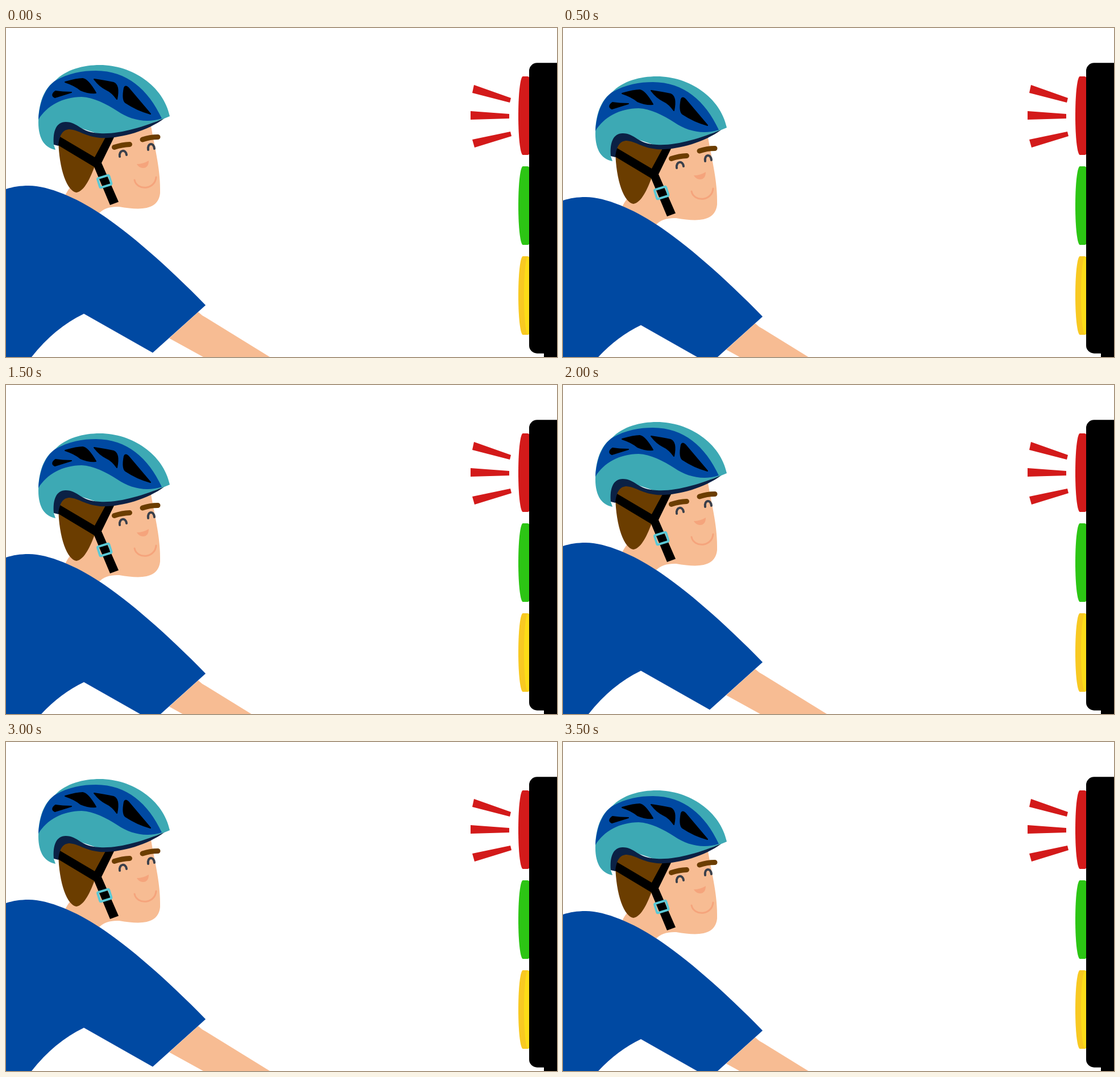
These frames come from a looping animation (969 by 578 pixels, 4000 ms). An HTML page with a canvas:

```html
<!DOCTYPE html>
<html lang="en">
<head>
<meta charset="utf-8">
<title>Cyclist at the lights</title>
<style>
  html, body { margin: 0; width: 100%; height: 100%; overflow: hidden; background: #fff; }
  canvas { display: block; }
</style>
</head>
<body>
<canvas id="stage" width="969" height="578"></canvas>
<script>
const ctx = document.getElementById('stage').getContext('2d');
const LOOP = 4000, BEAT = 500, DROP = 20;
const SKIN = '#f7bc93', BLUSH = '#f5a47c', HAIR = '#6b3d00', BLUE = '#0049a2',
      TEAL = '#3da9b4', NAVY = '#0b2145', RED = '#d31a1a';

function fill(d, color) {
  ctx.fillStyle = color;
  ctx.fill(new Path2D(d));
}

function line(d, color, width, cap = 'butt') {
  ctx.strokeStyle = color;
  ctx.lineWidth = width;
  ctx.lineCap = cap;
  ctx.lineJoin = 'round';
  ctx.stroke(new Path2D(d));
}

function drawBody() {
  fill('M338 499 Q344 505 352 509 L464 578 L496 598 H384 L347 578 L287 545 Z', SKIN);
  fill('M116 277 Q110 282 104 294 L164 325 Q176 313 199 314 C240 321 268 319 271 290 C272 250 263 218 255 172 L150 188 Z', SKIN);
  fill('M0 283 C12 279 25 277 40 277 C75 277 125 299 164 325 C215 358 285 419 351 487 L258 570.5 L137 502 Q85 527 45 578 L32 600 H0 Z', BLUE);
}

function drawFace() {
  line('M190.5 209.5 Q204 205 217.5 204.5', HAIR, 9, 'round');
  line('M240 196 Q253 191.5 267 191.5', HAIR, 9, 'round');
  line('M200 226 C198 214 211 212 212 223', '#3a404b', 4, 'round');
  line('M250 214 C248 202 260 200 261 212', '#3a404b', 4, 'round');
  fill('M230 239 Q241 239 251 233 C251 243 246 246 241 246 Q234 246 230 239 Z', BLUSH);
  line('M226 267 C230 286 262 285 264 262', BLUSH, 3, 'round');
}

function drawStraps() {
  fill('M95 191 L156 227 L175 192 H190 L168 237 L198 305.5 L183 311 L155 244 L90 205 Z', '#000');
  ctx.save();
  ctx.translate(173.2, 269.5);
  ctx.rotate(-0.3);
  ctx.strokeStyle = '#5bc9d6';
  ctx.lineWidth = 4;
  ctx.beginPath();
  ctx.roundRect(-10.5, -8.5, 21, 17, 2);
  ctx.stroke();
  ctx.restore();
}

function drawHelmet() {
  fill('M57 161 C58 126 70 104 86 93 C105 73 136 65 165 65 C222 65 277 102 288 155 L276 160 C240 174 200 188 165 187 L108 168 L90 180 L84 205 L87 214 C65 210 56 190 57 161 Z', TEAL);
  fill('M57 161 C59 126 71 104 86 93 C110 79 135 75 158 75 C213 75 250 108 274 159 C246 168 218 161 196 146 C176 133 154 122 133 121 C100 121 71 137 57 161 Z', BLUE);
  fill('M278 159 C240 174 200 187 165 185 C131 184 127 165 105 165 C88 165 82 182 84 205 L92 207 C94 186 101 178 112 178 C130 180 138 190 165 193 C198 195 247 182 278 159 Z', NAVY);
  const vents = [
    'M87 111 Q99 113 115 113 Q102 117 86 122 Q78 118 87 111 Z',
    'M104 95 Q124 89 135 89 Q144 90 158 114 Q145 115 131 109 Q122 101 104 95 Z',
    'M155 90 Q175 93 189 96 Q200 100 195 125 Q187 113 176 108 Q165 103 155 90 Z',
    'M208 105 Q210 100 215 105 L254 151 Q231 145 210 131 Q204 126 208 105 Z'
  ];
  for (const vent of vents) {
    fill(vent, '#000');
    line(vent, '#000', 2);
  }
}

function drawCyclist(offset) {
  ctx.save();
  ctx.translate(0, offset);
  drawBody();
  fill('M92 195 C93 250 108 287 124 289 C138 287 149 262 157 240 L186 190 L150 187 L112 174 L96 182 Z', HAIR);
  drawFace();
  drawStraps();
  drawHelmet();
  ctx.restore();
}

function drawLamp(top, color) {
  ctx.save();
  ctx.translate(901, top);
  fill('M8 0 H16 Q20 0 20 6 V132 Q20 138 16 138 H8 C4 138 0 112 0 69 C0 26 4 0 8 0 Z', color);
  ctx.restore();
}

function drawSignal() {
  fill('M823 100 L888 123 L886 131 L820 114 Z', RED);
  fill('M817 146 L885 151 V159 L817 161 Z', RED);
  fill('M820 196 L887 182 L889 190 L824 210 Z', RED);
  drawLamp(85, RED);
  drawLamp(243, '#2cc514');
  drawLamp(401, '#f8c922');
  fill('M917 402 H921 V538 H917 C913 530 911 503 911 470 C911 437 913 410 917 402 Z', '#fcdc18');
  ctx.fillStyle = '#000';
  ctx.beginPath();
  ctx.roundRect(920, 61.3, 70, 510.4, 14);
  ctx.fill();
  ctx.fillRect(946, 571, 23, 7);
}

function frame(now) {
  const beat = Math.floor((now % LOOP) / BEAT);
  ctx.fillStyle = '#fff';
  ctx.fillRect(0, 0, 969, 578);
  drawCyclist(beat % 2 ? DROP : 0);
  drawSignal();
  requestAnimationFrame(frame);
}

frame(0);
</script>
</body>
</html>
```
